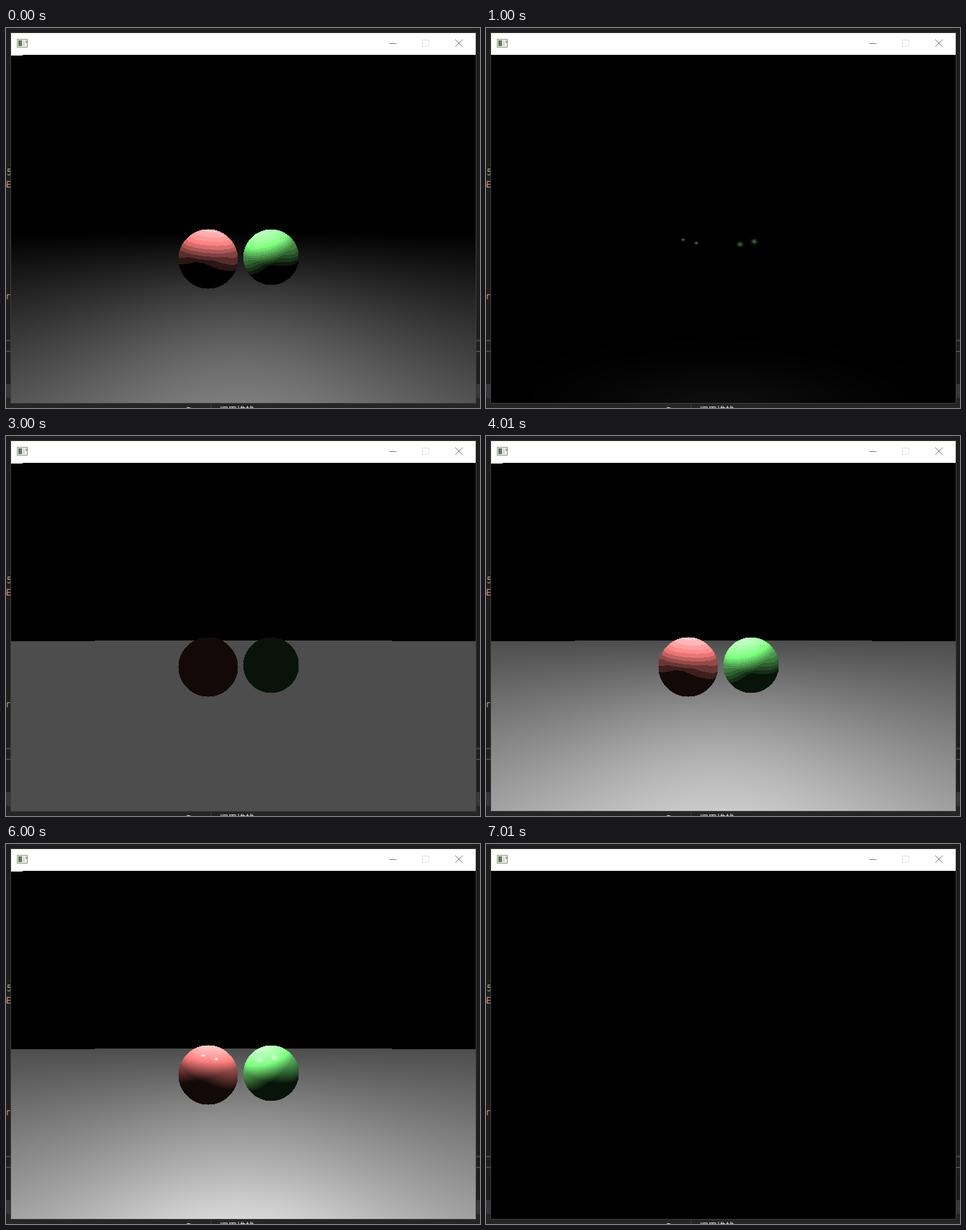
Recreate the animation shown at these times as an HTML page with a canvas. Size 653 px wide and 524 px high, loop 8000 ms.

```html
<!DOCTYPE html>
<html lang="en">
<head>
<meta charset="utf-8">
<title>Light toggles</title>
<style>
html, body { margin: 0; width: 100%; height: 100%; overflow: hidden; background: #1e1e1e; }
svg, canvas { position: absolute; display: block; }
svg { left: 0; top: 0; }
canvas { left: 7px; top: 37px; }
.code { font: 12px "DejaVu Sans Mono", monospace; }
.cjk { font: 12px "Noto Sans CJK SC", "Noto Sans CJK", sans-serif; }
</style>
</head>
<body>
<svg width="653" height="524" viewBox="0 0 653 524">
  <rect width="653" height="524" fill="#1e1e1e"/>
  <g fill="#464646">
    <rect y="430" width="653" height="2"/>
    <rect y="445" width="653" height="2"/>
  </g>
  <rect y="491" width="653" height="19" fill="#37373a"/>
  <rect y="510" width="653" height="14" fill="#252526"/>
  <rect x="282" y="518" width="1" height="6" fill="#3a3a3c"/>
  <g class="code">
    <text x="1" y="203" fill="#b5a78c">5</text>
    <text x="-6" y="220" fill="#5fae7c">G</text>
    <text x="0" y="220" fill="#d08a78">E</text>
    <text x="-8" y="374" fill="#c99a80">&amp;r</text>
  </g>
  <g class="cjk" fill="#e6e6e6">
    <text x="248" y="532">P</text>
    <text x="294" y="532">调用堆栈</text>
  </g>
  <rect x="6.5" y="6.5" width="641" height="511" fill="#000" stroke="#3c3c3c"/>
  <rect x="7" y="7" width="640" height="30" fill="#fff"/>
  <g shape-rendering="crispEdges">
    <rect x="15.5" y="15.5" width="14" height="11" fill="#f2f4ee" stroke="#8fa085"/>
    <rect x="17" y="17" width="5" height="8" fill="#66756c"/>
    <rect x="23" y="17" width="3" height="8" fill="#d5dacf"/>
    <rect x="27" y="17" width="2" height="4" fill="#a9b5a4"/>
    <rect x="528" y="21" width="10" height="1" fill="#8c8c7c"/>
    <rect x="573.5" y="16.5" width="9" height="9" fill="none" stroke="#e2e2dc"/>
  </g>
  <path d="M619 16l10 10m0-10l-10 10" stroke="#85857a" fill="none"/>
</svg>
<canvas id="view" width="640" height="480"></canvas>
<script>
const LEFT = 7, TOP = 37, W = 640, H = 480, LOOP = 8000;
const DIFFUSE = 1, SPECULAR = 2, AMBIENT = 4;

// Start time of each light combination, counted up in binary.
const steps = [
  [0, 1], [1000, 2], [2000, 3], [3000, 4],
  [4010, 5], [5000, 6], [6000, 7], [7010, 0]
];

const spheres = [
  {
    x: 278.5, y: 318.5, r: 41, band: 0.17,
    color: [255, 128, 128], ambient: [18, 9, 8],
    lights: [[-0.27, -0.956, 0.1], [0.41, -0.86, 0.29]],
    glints: [[271.5, 292, 1.6, 1], [289.8, 296.6, 1.6, 1.2]],
    shine: [95, 108, 92]
  },
  {
    x: 365.2, y: 316, r: 38.3, band: 0.1,
    color: [128, 255, 128], ambient: [8, 20, 10],
    lights: [[-0.62, -0.74, 0.25], [0.17, -0.93, 0.33]],
    glints: [[350, 298.3, 2.4, 2], [369.5, 294.5, 2.5, 2]],
    shine: [70, 98, 66]
  }
];

const bell = (dx, dy, sx, sy) => Math.exp(-((dx / sx) ** 2 + (dy / sy) ** 2) / 2);

function shadeSphere(s, x, y, mode) {
  const nx = (x - s.x) / s.r, ny = (y - s.y) / s.r;
  const d = nx * nx + ny * ny;
  if (d > 1) return null;
  const nz = Math.sqrt(1 - d);
  let lit = 0, glint = 0;
  if (mode & DIFFUSE) {
    for (const [lx, ly, lz] of s.lights) {
      lit += 0.8 * Math.max(0, nx * lx + ny * ly + nz * lz);
    }
    if (!(mode & SPECULAR)) lit = Math.round(lit / s.band) * s.band;
  }
  if (mode & SPECULAR) {
    for (const [gx, gy, sx, sy] of s.glints) glint += bell(x - gx, y - gy, sx, sy);
  }
  const base = mode & AMBIENT ? 1 : 0;
  return s.color.map((c, i) => c * lit + s.ambient[i] * base + s.shine[i] * glint);
}

function shadeFloor(x, y, mode) {
  const dx = x - 320, u = y - 282;
  if (u < (x < 122 || x > 532 ? 1 : 0)) return [0, 0, 0];
  let v = 0;
  if (mode & AMBIENT) v += 77;
  if (mode & DIFFUSE) v += 177 * u / Math.sqrt(u * u + 55700 + 1.31 * dx * dx);
  if (mode & SPECULAR) v += 13 * bell(dx, y - 520, 125, 36);
  return [v, v, v];
}

function render(mode) {
  const img = new ImageData(W, H);
  let k = 0;
  for (let j = 0; j < H; j++) {
    for (let i = 0; i < W; i++) {
      const x = LEFT + i + 0.5, y = TOP + j + 0.5;
      const rgb = shadeSphere(spheres[0], x, y, mode)
        || shadeSphere(spheres[1], x, y, mode)
        || shadeFloor(x, y, mode);
      for (const c of rgb) img.data[k++] = c;
      img.data[k++] = 255;
    }
  }
  // Bright sliver under the title bar in the lit states.
  if (mode & (DIFFUSE | AMBIENT)) img.data.fill(255, 0, 16 * 4);
  return img;
}

const ctx = document.getElementById("view").getContext("2d");
const views = steps.map(([, mode]) => render(mode));
const start = performance.now();
let shown = -1;

function tick() {
  const t = (performance.now() - start) % LOOP;
  const now = steps.findLastIndex(([at]) => t >= at);
  if (now !== shown) {
    ctx.putImageData(views[now], 0, 0);
    shown = now;
  }
  requestAnimationFrame(tick);
}
tick();
</script>
</body>
</html>
```
